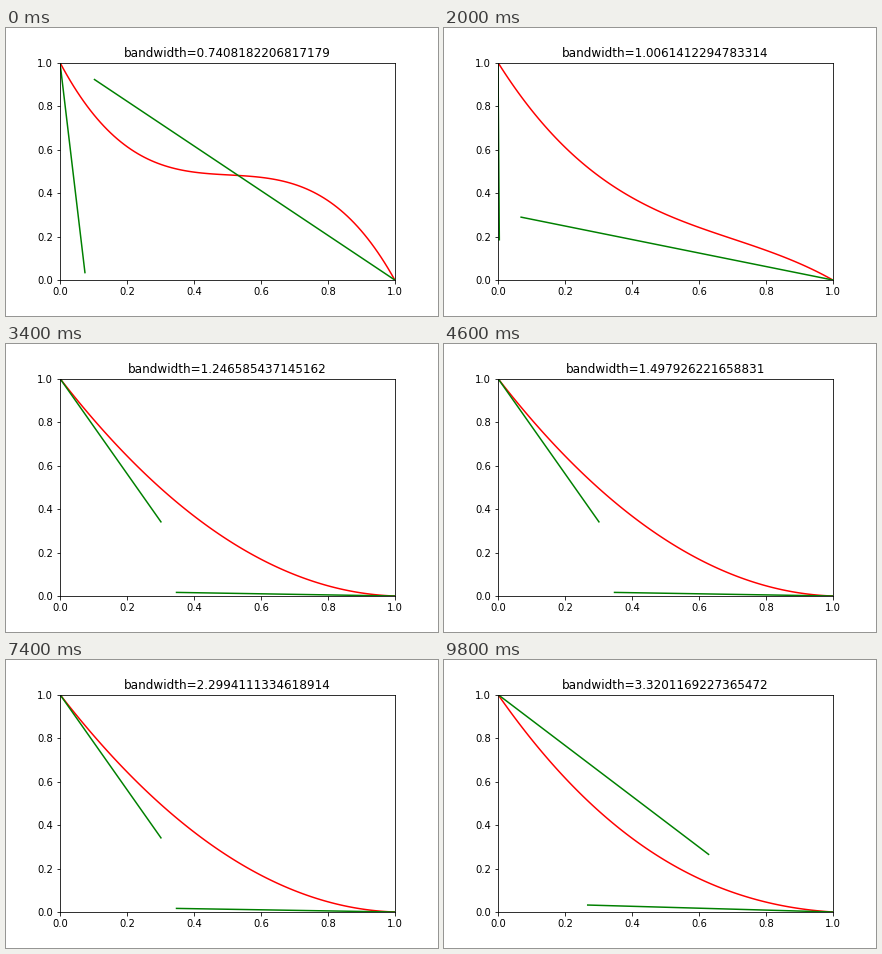
Write a matplotlib script that moves like this. It is 432 by 288 pixels and loops after 10 s.

```python
import math

import numpy as np
import matplotlib.pyplot as plt
from matplotlib.animation import FuncAnimation

FRAMES = 50
SETTLED = 3      # pose held through the middle of the loop
LAST_JUMP = 40

# key points: tips of the left and right handles
LEFT = [(0.0745, 0.034), (0.587, 0.126), (0.004, 0.185), (0.3015, 0.341), (0.629, 0.265)]
RIGHT = [(0.103, 0.922), (0.898, 0.658), (0.069, 0.289), (0.348, 0.0165), (0.268, 0.032)]

widths = [math.exp(x) for x in np.linspace(-0.3, 1.2, FRAMES)]

plt.rcParams["font.family"] = "DejaVu Sans"
fig, ax = plt.subplots(figsize=(6, 4), dpi=72)
fig.subplots_adjust(left=0.125, right=0.9, bottom=0.125, top=0.88)
ax.set_xlim(0, 1)
ax.set_ylim(0, 1)

t = np.linspace(0, 1, 100)
curve, = ax.plot([], [], color="red")
left, = ax.plot([], [], color="green")
right, = ax.plot([], [], color="green")
title = ax.set_title("")


def cubic(a, b):
    """Cubic Bernstein curve falling from 1 to 0 with inner heights a and b."""
    s = 1 - t
    return s**3 + 3 * s**2 * t * a + 3 * s * t**2 * b


def pose(i):
    """Jump every six frames until settled, then once more near the end."""
    return min((i + 2) // 6, SETTLED) + (i >= LAST_JUMP)


def draw(i):
    p, q = LEFT[pose(i)], RIGHT[pose(i)]
    curve.set_data(t, cubic(p[1], q[1]))
    left.set_data([0, p[0]], [1, p[1]])
    right.set_data([1, q[0]], [0, q[1]])
    title.set_text(f"bandwidth={widths[i]}")
    return curve, left, right, title


anim = FuncAnimation(fig, draw, frames=FRAMES, interval=1000 / 5, repeat=True,
                     repeat_delay=0, init_func=lambda: draw(0))
plt.show()
```
